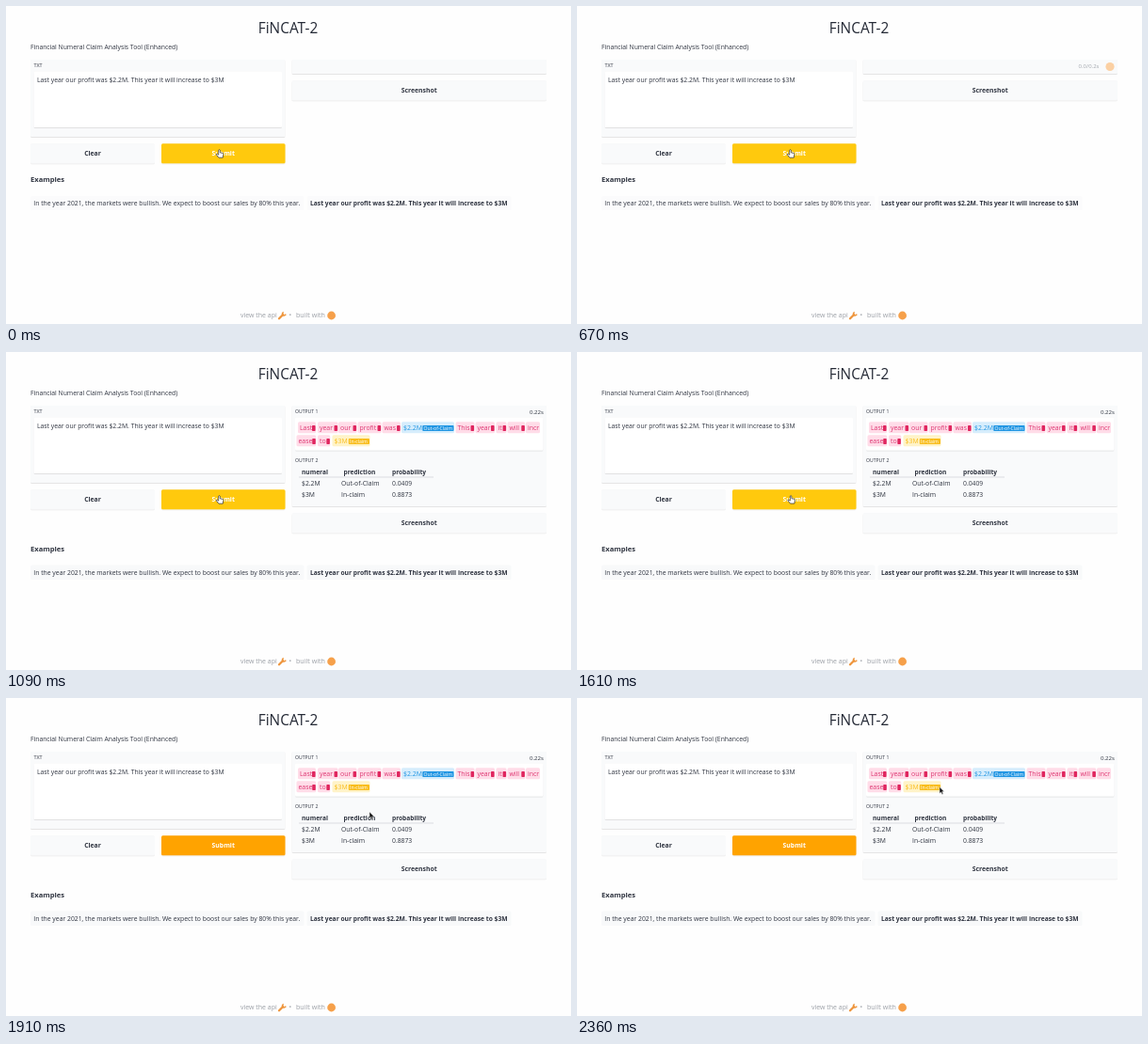
Recreate the animation shown at these times as an HTML page. Size 600 px wide and 338 px high, loop 2390 ms.

```html
<!DOCTYPE html>
<html lang="en">
<head>
<meta charset="utf-8">
<title>Claim analysis demo</title>
<style>
  html, body { margin: 0; width: 100%; height: 100%; overflow: hidden; background: #fefefe; }
  svg { display: block; width: 100vw; height: 100vh; }
  text { font-family: "Open Sans", "Noto Sans", sans-serif; white-space: pre; }
</style>
</head>
<body>
<svg id="stage" viewBox="0 0 600 338">
  <defs>
    <filter id="shadow" x="-5%" y="-20%" width="110%" height="150%">
      <feDropShadow dx="0" dy="0.6" stdDeviation="0.6" flood-color="#000" flood-opacity="0.16"/>
    </filter>
  </defs>
</svg>
<script>
const LOOP = 2390, LOAD_START = 330, RESULT_START = 1090;
const INK = '#2f3440', PANEL = '#f9fafb';
const stage = document.getElementById('stage');

function add(parent, tag, attrs, content) {
  const node = document.createElementNS('http://www.w3.org/2000/svg', tag);
  for (const key in attrs) node.setAttribute(key, attrs[key]);
  if (content) node.textContent = content;
  parent.append(node);
  return node;
}
const group = (parent = stage) => add(parent, 'g', {});
const rect = (parent, x, y, width, height, fill, more) =>
  add(parent, 'rect', { x, y, width, height, fill, rx: 1.5, ...more });
const text = (parent, x, y, size, content, more) =>
  add(parent, 'text', { x, y, 'font-size': size, fill: INK, ...more }, content);
const raised = { filter: 'url(#shadow)' };
const bold = { 'font-weight': 700 };

function button(parent, x, y, width, label, fill, color) {
  const face = rect(parent, x, y, width, 21, fill, raised);
  text(parent, x + width / 2, y + 13, 6.82, label, { ...bold, fill: color, 'text-anchor': 'middle' });
  return face;
}

// Header, input panel and buttons
text(stage, 299.5, 28.5, 15.4, 'FiNCAT-2', { 'text-anchor': 'middle', fill: '#252a36' });
text(stage, 26, 46.3, 6.8, 'Financial Numeral Claim Analysis Tool (Enhanced)');
rect(stage, 26, 57, 270.5, 82, PANEL, raised);
text(stage, 29.5, 65, 5.4, 'TXT');
rect(stage, 29.5, 69.5, 263.5, 59.5, '#fff', raised);
text(stage, 33, 81, 6.82, 'Last year our profit was $2.2M. This year it will increase to $3M');
button(stage, 26, 146.3, 132, 'Clear', PANEL, INK);
const submit = button(stage, 165, 146.3, 131.5, 'Submit', '#ffc90c', '#fff');

// Examples
const examples = group();
text(examples, 26, 187, 7.6, 'Examples', bold);
const exampleBoxes = [[26, 290.5], [319.5, 217]].map(([x, w]) => rect(examples, x, 202, w, 15.3, '#fbfbfc'));
text(examples, 29.3, 212, 6.83, 'In the year 2021, the markets were bullish. We expect to boost our sales by 80% this year.');
text(examples, 323, 212, 6.71, 'Last year our profit was $2.2M. This year it will increase to $3M', bold);

// Empty output and loading indicator
const pending = group();
rect(pending, 303.5, 57, 270.5, 15, PANEL, raised);
const loader = group(pending);
text(loader, 532.5, 66.3, 6, '0.0/0.2s', { fill: '#a3a7ae' });
const spinner = add(loader, 'circle', { cx: 566, cy: 64.5, r: 4, fill: '#fbd0a3' });

// Results
const result = group();
rect(result, 303.5, 57, 270.5, 107, PANEL, raised);
text(result, 307, 65, 5.1, 'OUTPUT 1');
text(result, 571, 66.3, 6.1, '0.22s', { 'text-anchor': 'end' });
rect(result, 307, 69.5, 263.5, 35, '#fff', raised);

function token(x, y, width, word, marked = true) {
  rect(result, x, y, width, 12, '#ffdce8');
  text(result, x + 2, y + 8.7, 6.9, word, { fill: '#dd3470' });
  if (marked) rect(result, x + width - 4, y + 3.8, 3.6, 6, '#e0265f', { rx: 0.8 });
}
function claim(x, y, width, word, tagX, tag, pale, strong) {
  rect(result, x, y, width, 12, pale);
  text(result, x + 2, y + 8.7, 6.9, word, { fill: strong });
  rect(result, tagX, y + 3.8, x + width - tagX - 0.5, 6, strong, { rx: 0.8 });
  text(result, tagX + 1.3, y + 8.5, 5.1, tag, { fill: '#fff' });
}
[[310, 19, 'Last'], [331, 21.5, 'year'], [353, 19.5, 'our'], [373.5, 25, 'profit'], [399.5, 19.5, 'was'],
 [477.5, 20, 'This'], [498.5, 20.5, 'year'], [520.5, 11, 'it'], [532.5, 18.8, 'will']]
  .forEach(([x, width, word]) => token(x, 74.3, width, word));
token(552, 74.3, 15, 'incr', false);
token(308.5, 88.3, 20.7, 'ease');
token(331, 88.3, 13.3, 'to');
claim(420, 74.3, 56, '$2.2M', 442.3, 'Out-of-Claim', '#d6edfc', '#2196e3');
claim(346.5, 88.3, 40, '$3M', 363.8, 'In-claim', '#fff3c8', '#f9bd1c');

text(result, 307, 117.2, 5.1, 'OUTPUT 2');
const columns = [[314, 314, 'numeral'], [358.5, 356, 'prediction'], [410, 410, 'probability']];
columns.forEach(([x, , label]) => text(result, x, 129.6, 6.6, label, bold));
rect(result, 311, 132.7, 143, 0.6, '#c5c8ce', { rx: 0 });
[['$2.2M', 'Out-of-Claim', '0.0409'], ['$3M', 'In-claim', '0.8873']].forEach((row, r) =>
  row.forEach((cell, c) => text(result, columns[c][1], 142.2 + r * 11.4, 6.8, cell)));

const screenshot = group();
button(screenshot, 303.5, 79.3, 270.5, 'Screenshot', PANEL, INK);

// Footer
const footerInk = { fill: '#9b9fa6' };
text(stage, 249, 331, 7, 'view the api', footerInk);
add(stage, 'path', { d: 'M290 332.3L294.2 328', stroke: '#ee963e', 'stroke-width': 2.3, 'stroke-linecap': 'round' });
add(stage, 'path', { d: 'M294.6 325.2Q292.6 327 294 328.6Q295.8 329.8 297.3 327.6', fill: 'none', stroke: '#ee963e', 'stroke-width': 1.5 });
text(stage, 300.6, 331, 7, '•', footerInk);
text(stage, 308, 331, 7.1, 'built with', footerInk);
add(stage, 'circle', { cx: 345.6, cy: 329, r: 4.4, fill: '#f6a04a' });

// Pointers, both with their tip at the local origin
const hand = add(stage, 'path', {
  d: 'M-.8 .6Q0 -.5 .8 .6V3.2L3.8 3.8Q4.6 4.1 4.4 5L3.8 8.6H-.6L-3.2 5.4Q-3.2 4.2 -2 4.7L-.8 5.6Z',
  fill: '#fff', stroke: '#333', 'stroke-width': 0.75, 'stroke-linejoin': 'round'
});
const arrow = add(stage, 'path', {
  d: 'M0 0V7L1.6 5.6L2.7 8L3.9 7.4L2.8 5.1H4.9Z',
  fill: '#181818', stroke: '#fff', 'stroke-width': 0.4
});

// Time, x, y of the pointer tip
const path = [[1600, 226.5, 152.6], [1910, 386, 121], [2030, 386, 121], [2130, 397, 97], [2240, 392, 90], [2360, 385, 94.5]];

function pointerAt(t) {
  if (t <= path[0][0]) return path[0].slice(1);
  for (let i = 1; i < path.length; i++) {
    const [t0, x0, y0] = path[i - 1], [t1, x1, y1] = path[i];
    if (t < t1) {
      const u = (t - t0) / (t1 - t0), e = u * u * (3 - 2 * u);
      return [x0 + (x1 - x0) * e, y0 + (y1 - y0) * e];
    }
  }
  return path[path.length - 1].slice(1);
}
const show = (node, on) => node.setAttribute('visibility', on ? 'visible' : 'hidden');
const move = (node, x, y) => node.setAttribute('transform', `translate(${x} ${y})`);

function render(t) {
  const done = t >= RESULT_START;
  show(pending, !done);
  show(loader, !done && t >= LOAD_START);
  show(result, done);
  spinner.setAttribute('r', 4.1 + 0.5 * Math.cos((t - 670) / 390 * Math.PI));
  move(screenshot, 0, done ? 92 : 0);
  move(examples, 0, done ? 24.6 : 0);
  exampleBoxes.forEach(box => box.setAttribute('fill', done ? '#f8f9fa' : '#fbfbfc'));

  const [x, y] = pointerAt(t), hovering = x < 296.5;
  submit.setAttribute('fill', hovering ? '#ffc90c' : '#ffa304');
  show(hand, hovering);
  show(arrow, !hovering);
  move(hand, x, y);
  move(arrow, x, y);
}

const start = performance.now();
function tick() {
  render((performance.now() - start) % LOOP);
  requestAnimationFrame(tick);
}
tick();
</script>
</body>
</html>
```
